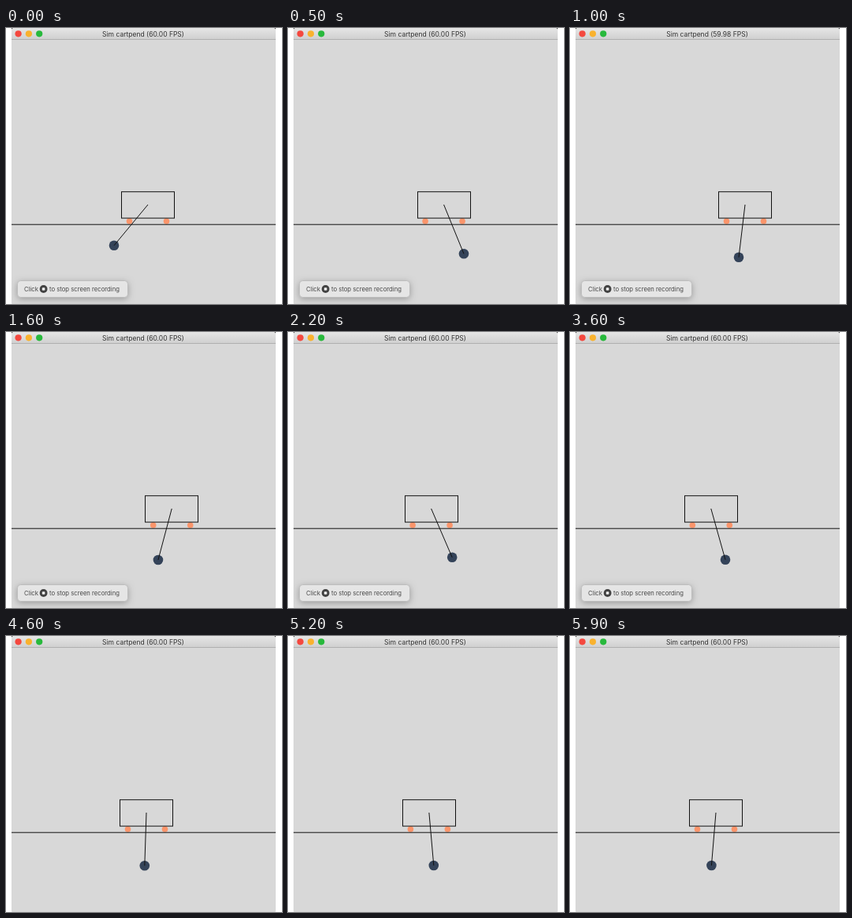
Write an HTML page with a canvas that moves like this. It is 350 px wide and 350 px high and loops after 6 s.

```html
<!DOCTYPE html>
<html lang="en">
<head>
<meta charset="utf-8">
<title>Cart pendulum</title>
<style>
html, body { margin: 0; width: 100%; height: 100%; overflow: hidden; background: #fff; }
canvas { display: block; width: 350px; height: 350px; }
</style>
</head>
<body>
<canvas id="stage" width="350" height="350"></canvas>
<script>
const ctx = document.getElementById('stage').getContext('2d');
const LOOP = 6, STEP = 0.1, ROD = 67.3, PIVOT_Y = 224;

// Known poses: time in seconds, cart centre, horizontal bob offset
const poses = [
  [0, 180, -43], [1, 222, -8], [2.2, 181.6, 26.6], [3, 183.6, -16.4],
  [3.6, 178.8, 18.2], [4.6, 178, -2.2], [5.9, 185, -5.6]
];

// Damped swing whose phase is shifted while the cart makes its long run
function swing(t) {
  const shift = t < 2.2 ? 0.75 * Math.sin(Math.PI * t / 2.2) ** 2 : 0;
  return 0.719 * Math.exp(-0.257 * t) * Math.cos(2 * Math.PI * (t - 3.57) / 1.4 + shift);
}
const recoil = t => -0.17 * ROD * Math.sin(swing(t));

const cartDrift = poses.map(([t, x]) => [t, x - recoil(t)]);
const angleDrift = poses.map(([t, , dx]) => [t, Math.asin(dx / ROD) - swing(t)]);

// Cubic curve through [time, value] pairs
function curve(keys, t) {
  const last = keys.length - 1;
  let i = 0;
  while (i < last - 1 && t >= keys[i + 1][0]) i++;
  const slope = k => {
    const a = keys[Math.max(k - 1, 0)], b = keys[Math.min(k + 1, last)];
    return (b[1] - a[1]) / (b[0] - a[0]);
  };
  const [t0, v0] = keys[i], [t1, v1] = keys[i + 1];
  const h = t1 - t0, u = (t - t0) / h, w = 1 - u;
  return v0 * w * w * (1 + 2 * u) + v1 * u * u * (3 - 2 * u)
    + h * u * w * (slope(i) * w - slope(i + 1) * u);
}

function disc(x, y, r, color) {
  ctx.fillStyle = color;
  ctx.beginPath();
  ctx.arc(x, y, r, 0, Math.PI * 2);
  ctx.fill();
}

function line(x0, y0, x1, y1, color = '#111') {
  ctx.strokeStyle = color;
  ctx.beginPath();
  ctx.moveTo(x0, y0);
  ctx.lineTo(x1, y1);
  ctx.stroke();
}

function label(text, x, y, size, color, align = 'left') {
  ctx.font = `${size}px Inter, sans-serif`;
  ctx.textAlign = align;
  ctx.fillStyle = color;
  ctx.fillText(text, x, y);
}

function drawWindow(t) {
  ctx.fillStyle = '#fff';
  ctx.fillRect(0, 0, 350, 350);
  ctx.fillStyle = '#222';
  ctx.fillRect(7, 0, 335, 4);
  ctx.fillStyle = '#d8d8d8';
  ctx.beginPath();
  ctx.roundRect(7, 0, 335, 350, [3, 3, 1, 1]);
  ctx.fill();

  const bar = ctx.createLinearGradient(0, 0, 0, 14);
  bar.addColorStop(0, '#e6e6e6');
  bar.addColorStop(1, '#d0d0d0');
  ctx.fillStyle = bar;
  ctx.beginPath();
  ctx.roundRect(7, 0, 335, 14, [3, 3, 0, 0]);
  ctx.fill();
  line(7, 14.5, 342, 14.5, '#b0b0b0');

  ['#f4483f', '#f9b22e', '#28b93c'].forEach((c, i) => disc(15.6 + 13.3 * i, 7.3, 4.1, c));
  const fps = t >= 0.65 && t < 1.45 ? '59.98' : '60.00';
  label(`Sim cartpend (${fps} FPS)`, 174, 10.7, 8.5, '#333', 'center');
}

function drawCart(t) {
  const x = curve(cartDrift, t) + recoil(t);
  const angle = curve(angleDrift, t) + swing(t);
  const bobX = x + ROD * Math.sin(angle), bobY = PIVOT_Y + ROD * Math.cos(angle);

  disc(x - 23.5, 245, 3.8, '#fb956b');
  disc(x + 23.5, 245, 3.8, '#fb956b');
  line(7, 249.2, 342, 249.2);
  ctx.strokeRect(Math.round(x - 34) + 0.5, 207.7, 67, 33.4);
  disc(bobX, bobY, 6.3, '#344359');
  line(x, PIVOT_Y, bobX, bobY);
}

function drawToast(t) {
  const alpha = Math.min(1, Math.max(0, (4.25 - t) / 0.2));
  if (!alpha) return;
  ctx.save();
  ctx.globalAlpha = alpha;
  ctx.beginPath();
  ctx.roundRect(14.5, 320.5, 140, 21, 4);
  ctx.save();
  ctx.shadowColor = 'rgba(0,0,0,.3)';
  ctx.shadowBlur = 8;
  ctx.shadowOffsetY = 2;
  ctx.fillStyle = '#e5e5e5';
  ctx.fill();
  ctx.restore();
  ctx.strokeStyle = '#bdbdbd';
  ctx.stroke();
  label('Click', 23, 333.6, 7.7, '#484848');
  label('to stop screen recording', 55, 333.6, 7.7, '#484848');
  disc(47.6, 331, 4.9, '#424242');
  ctx.fillStyle = '#f2f2f2';
  ctx.beginPath();
  ctx.roundRect(45.8, 329.2, 3.6, 3.6, 0.8);
  ctx.fill();
  ctx.restore();
}

function frame(now) {
  const elapsed = now / 1000 % LOOP;
  const t = Math.floor(elapsed / STEP + 1e-6) * STEP;
  ctx.lineWidth = 1;
  drawWindow(t);
  drawCart(t);
  drawToast(t);
  requestAnimationFrame(frame);
}

const start = performance.now();
frame(0);
function tick(now) { frame(Math.max(0, now - start)); }
</script>
</body>
</html>
```
